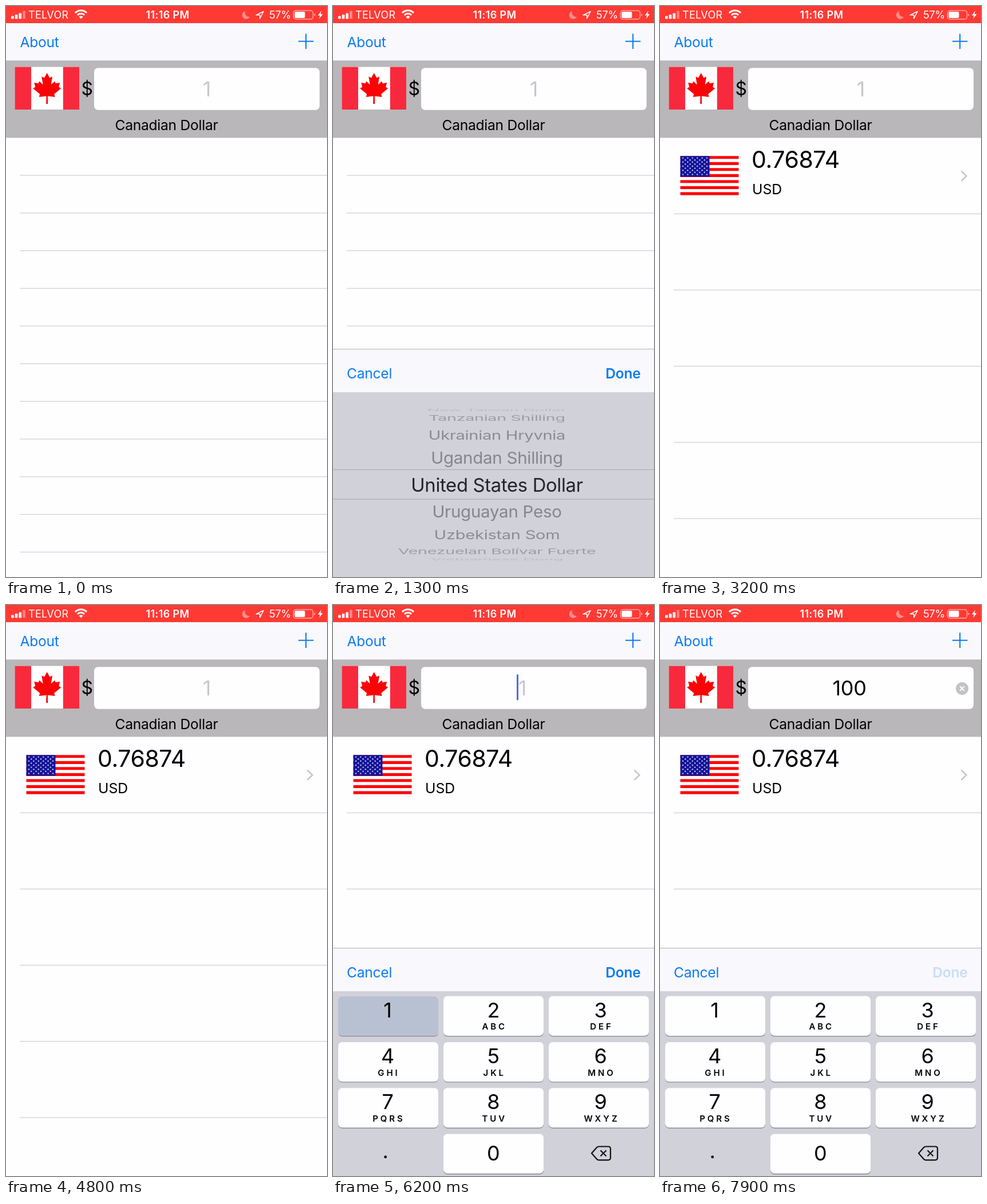
Write an HTML page that moves like this. It is 561 by 998 pixels and loops after 8 s.

```html
<!DOCTYPE html>
<html lang="en">
<head>
<meta charset="utf-8">
<title>Currency converter</title>
<style>
html, body { margin: 0; width: 100%; height: 100%; overflow: hidden; background: #fefdff; }
svg { display: block; width: 100vw; height: 100vh; }
text { font-family: Inter, Roboto, "Liberation Sans", sans-serif; font-optical-sizing: none; letter-spacing: -.01em; white-space: pre; }
.mid { text-anchor: middle; }
.end { text-anchor: end; }
.semi { font-weight: 600; }
.blue { fill: #0b7bf1; }
.letters { font-weight: 600; letter-spacing: 3.9px; }
</style>
</head>
<body>
<svg id="stage" viewBox="0 0 561 998"></svg>
<script>
const LOOP = 8000, STEP = 100;
const BLUE = '#0b7bf1', PAPER = '#fefdff', BAR = '#f9f8fc';

const range = n => [...Array(n).keys()];
const each = (list, fn) => list.map(fn).join('');
const rect = (x, y, w, h, fill, more = '') =>
  `<rect x="${x}" y="${y}" width="${w}" height="${h}" fill="${fill}" ${more}/>`;
const label = (str, x, y, size, cls = '', more = '') =>
  `<text x="${x}" y="${y}" font-size="${size}" class="${cls}" ${more}>${str}</text>`;
const line = (d, color, width, more = '') =>
  `<path d="${d}" fill="none" stroke="${color}" stroke-width="${width}" ${more}/>`;
const dot = (x, y, r, fill) => `<circle cx="${x}" cy="${y}" r="${r}" fill="${fill}"/>`;

function statusBar() {
  const bars = each([17.5, 15, 12.5, 8.5], (y, i) =>
    rect(9 + i * 6.7, y, 4.6, 22.5 - y, '#fff', `rx="1" opacity="${i < 3 ? 1 : .4}"`));
  const wifi = each([14, 8.5], r => {
    const d = r * .72;
    return line(`M${131 - d} ${22 - d}A${r} ${r} 0 0 1 ${131 + d} ${22 - d}`, '#fff', 3);
  }) + '<path d="M131 22.5l-3.6-3.8a5 5 0 0 1 7.2 0z" fill="#fff"/>';
  return rect(0, 0, 561, 30, '#ff3a34') + bars + wifi +
    label('TELVOR', 39, 22, 18, '', 'fill="#fff" style="letter-spacing:.3px"') +
    label('11:16 PM', 282.5, 22, 18, 'mid semi', 'fill="#fff" style="letter-spacing:.4px"') +
    '<path d="M418 9a7 7 0 1 0 8 10a7.5 7.5 0 0 1-8-10z" fill="#ff8f8b"/>' +
    line('M450 9.5L437 15.8H443.7V22z', '#fff', 1.5, 'stroke-linejoin="round"') +
    label('57%', 460, 22, 18, '', 'fill="#fff"') +
    rect(502.5, 8, 34, 15, 'none', 'rx="4" stroke="#ffaca9" stroke-width="1.4"') +
    rect(504.5, 10, 18, 11, '#fff', 'rx="2"') +
    '<path d="M538.5 13v5q2-.6 2-2.5t-2-2.5z" fill="#ffaca9"/>' +
    '<path d="M551 8.5l-6 8h3.8l-1.6 6 6.3-8.3h-3.9z" fill="#fff"/>';
}

function mapleFlag() {
  const half = [[0, -27], [4.6, -18.5], [9.4, -20.5], [7, -6.5], [13.5, -12.5], [15, -8.8], [22.5, -10],
    [20.5, -2.5], [24.5, 0], [12.5, 10], [14, 15], [1.2, 13.5], [1.5, 27]];
  const leaf = [...half, ...half.map(([x, y]) => [-x, y]).reverse()];
  return rect(15.5, 106.5, 112.5, 74.5, '#fff') +
    rect(15.5, 106.5, 28.5, 74.5, '#f8293d') + rect(99.8, 106.5, 28.2, 74.5, '#f8293d') +
    `<polygon transform="translate(71.7 144)" fill="#fb0207" points="${leaf.join(' ')}"/>`;
}

function starsFlag() {
  const h = 68.4 / 13;
  const stripes = each(range(13), i => rect(35.5, 262.2 + i * h, 102, h, i % 2 ? '#fff' : '#fd0408'));
  const stars = each(range(9), r => each(range(6 - r % 2), c =>
    dot(40 + c * 8.4 + r % 2 * 4.2, 265.6 + r * 3.6, 1.2, '#c9c9ee')));
  return stripes + rect(35.5, 262.2, 51, h * 7 - .6, '#14149a') + stars;
}

function header() {
  return rect(0, 30, 561, 66, BAR) + rect(0, 95.4, 561, 1.4, '#a9a8ac') +
    label('About', 24.5, 72, 24.6, 'blue') +
    line('M511 61.8H537.500M524.200 48.500V75', BLUE, 2.1, 'id="plus"') +
    rect(0, 96.8, 561, 133.6, '#b9b7b9') + mapleFlag() +
    label('$', 141.5, 156, 32, 'mid') +
    rect(154, 108.3, 394, 73.5, PAPER, 'rx="7"') +
    label('1', 351, 158, 36, 'mid', 'id="amount"') +
    rect(321, 121, 3, 45.5, '#4a6be6', 'id="caret" rx="1.5"') +
    `<g id="clear">${dot(528, 146, 11, '#c3c2c7')}${line('M524 142l8 8m0-8l-8 8', '#fff', 2)}</g>` +
    label('Canadian Dollar', 280.5, 216.5, 24.6, 'mid');
}

function table() {
  const lines = (n, gap) => each(range(n), i => rect(24, 229.5 + gap * (i + 1), 537, 1.2, '#cfced3'));
  return `<g id="blank">${lines(11, 65.85)}</g><g id="rates">${lines(5, 133.15)}${starsFlag()}` +
    label('0.76874', 160, 283, 41) + label('USD', 161, 329, 24.8, '', 'style="letter-spacing:0"') +
    line('M526.5 288.5l9 8.7-9 8.7', '#c5c4ca', 2.5) + '</g>';
}

function wheel() {
  const names = ['New Taiwan Dollar', 'Tanzanian Shilling', 'Ukrainian Hryvnia', 'Ugandan Shilling',
    'United States Dollar', 'Uruguayan Peso', 'Uzbekistan Som', 'Venezuelan Bolívar Fuerte', 'Vietnamese Dong'];
  // distance from the middle, vertical squash and colour by ring
  const rings = [[0, 1, '#232329'], [47, .95, '#85868c'], [87, .75, '#8b8c92'], [116.5, .45, '#9c9da3'], [130.5, .17, '#bbbcc2']];
  const rows = each(names, (name, i) => {
    const k = Math.abs(i - 4), [d, squash, color] = rings[k];
    const size = k ? 30 - .45 * k : 32.8;
    return `<g transform="translate(286.5 ${837 + Math.sign(i - 4) * d}) scale(1 ${squash})">` +
      label(name, 0, size * .36, size, 'mid', `fill="${color}"`) + '</g>';
  });
  return rows + rect(0, 809.8, 561, 1.3, '#b0b0b6') + rect(0, 861.4, 561, 1.3, '#b0b0b6');
}

function keypad() {
  const letters = ['', 'ABC', 'DEF', 'GHI', 'JKL', 'MNO', 'PQRS', 'TUV', 'WXYZ'];
  const key = (digit, col, row) => {
    const x = 9 + col * 184, y = 683.6 + row * 80.3, mid = [95.5, 280.3, 467.5][col];
    return rect(x, y + 1.4, 175, 69.3, '#88898e', 'rx="7"') + rect(x, y, 175, 69.3, PAPER, 'rx="7"') +
      rect(x, y, 175, 69.3, '#b8c1d2', `rx="7" id="key${digit}" opacity="0"`) +
      label(digit, mid, y + (digit ? 37 : 46.8), 36, 'mid') +
      (letters[digit - 1] ? label(letters[digit - 1], mid + 2, y + 58.8, 15, 'mid letters') : '');
  };
  return each(range(9), i => key(i + 1, i % 3, Math.floor(i / 3))) + key(0, 1, 3) +
    label('.', 91.5, 967, 36, 'mid') +
    line('M452 958.3l9-10.2q1.4-1.6 3.6-1.6H481q4 0 4 4v15.6q0 4-4 4H464.6q-2.2 0-3.6-1.6z', '#111', 2.2, 'stroke-linejoin="round"') +
    line('M467.5 953.3l10 10m0-10l-10 10', '#111', 2.2);
}

function panel() {
  return '<g id="panel">' + rect(0, 675, 561, 325, '#d1d2d9') + rect(0, 600, 561, 75, BAR) +
    rect(0, 599, 561, 1.4, '#c2c1c6') + label('Cancel', 24, 651, 24.6, 'blue') +
    label('Done', 537.5, 651, 24.6, 'blue semi end', 'id="done"') +
    `<g id="wheel">${wheel()}</g><g id="pad">${keypad()}</g></g>`;
}

const stage = document.getElementById('stage');
stage.innerHTML = rect(0, 0, 561, 998, PAPER) + table() + header() + statusBar() + panel();

const el = id => document.getElementById(id);
const show = (id, alpha) => el(id).setAttribute('opacity', +alpha);
const clamp = v => Math.max(0, Math.min(1, v));

// critically damped slide, 0 to 1
const slide = (t, start) => {
  const u = Math.max(0, t - start) * .018;
  return 1 - (1 + u) * Math.exp(-u);
};
// a tapped button dims at once, then comes back
const tapped = (t, start) => {
  if (t < start) return 1;
  const u = clamp((t - start) / 400);
  return .2 + .8 * u * u * (3 - 2 * u);
};
const pressed = (t, start) => t < start ? 0 : clamp(1 - (t - start) / 200);
const blink = u => u < 800 ? clamp(1 - (u - 400) / 300) : clamp((u - 900) / 300);

function draw(t) {
  const editing = t >= 5000, added = t >= 2600;
  const typed = [6300, 6900, 7200].filter(at => t >= at);
  const amount = el('amount');

  const up = t < 2600 ? slide(t, 230) : t < 4900 ? 1 - slide(t, 2628) : slide(t, 4945);
  el('panel').setAttribute('transform', `translate(0 ${400 * (1 - up)})`);
  show('wheel', t < 4900);
  show('pad', t >= 4900);
  show('blank', !added);
  show('rates', added);
  show('plus', tapped(t, 100));
  show('done', t < 4900 ? tapped(t, 2600) : tapped(t, 7900));
  show('key1', pressed(t, 6200));
  show('key0', Math.max(t < 7100 ? pressed(t, 6800) : 0, pressed(t, 7100)));

  amount.textContent = '100'.slice(0, typed.length || 1);
  amount.setAttribute('x', editing ? 331 : 351);
  amount.setAttribute('fill', typed.length ? '#000' : '#c8c7cc');
  el('caret').setAttribute('x', typed.length ? 331 + amount.getComputedTextLength() / 2 : 321);
  show('caret', editing && blink(t - (typed.at(-1) || 5000)));
  show('clear', typed.length > 0);
}

const begin = performance.now();
function tick() {
  const t = (performance.now() - begin) % LOOP;
  draw(Math.floor(t / STEP) * STEP);
  requestAnimationFrame(tick);
}
tick();
</script>
</body>
</html>
```
